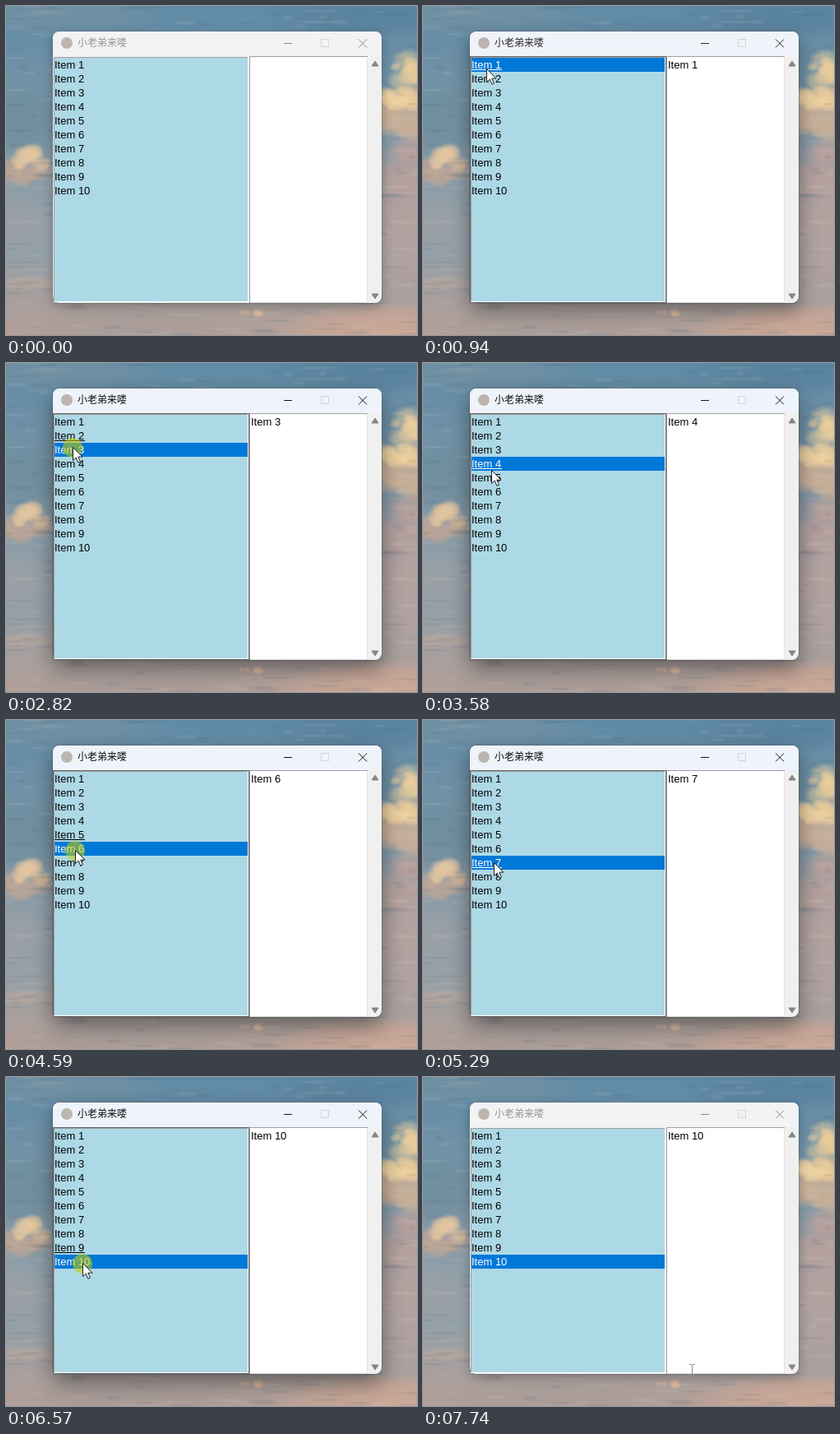
An HTML page with a canvas for the animation above (7800 ms loop, 500x400 px).

```html
<!DOCTYPE html>
<html lang="zh">
<head>
<meta charset="utf-8">
<title>Listbox</title>
<style>
  html, body { margin: 0; width: 100%; height: 100%; overflow: hidden; }
  #stage { position: relative; width: 500px; height: 400px; overflow: hidden; }
  #stage > * { position: absolute; left: 0; top: 0; }
  #stage > #win { left: 57px; top: 31px; width: 400px; height: 330px; border-radius: 8px; background: #f0f0f0; }
  text { font: 13px "Liberation Sans", Arial, sans-serif; white-space: pre; }
  #title { font: 12px "Noto Sans CJK SC", "Noto Sans CJK", sans-serif; }
</style>
</head>
<body>
<div id="stage">
  <canvas id="sky" width="500" height="400"></canvas>
  <div id="win"></div>
  <svg width="500" height="400" viewBox="0 0 500 400">
    <path id="bar" d="M57 61V39a8 8 0 0 1 8-8H449a8 8 0 0 1 8 8V61Z"/>
    <circle cx="74" cy="45" r="7" fill="#bdb6ae"/>
    <text id="title" x="87" y="49">小老弟来喽</text>
    <g id="buttons" fill="none">
      <path d="M338 45.5H348"/>
      <path d="M429 40.5L439 50.5M439 40.5L429 50.5"/>
    </g>
    <rect x="383.5" y="40.5" width="9" height="9" fill="none" stroke="#d3d5d9"/>

    <g shape-rendering="crispEdges">
      <rect x="58" y="62" width="237" height="298" fill="#add8e6"/>
      <path d="M58.5 360V62.5H295" fill="none" stroke="#a0a0a0"/>
      <path d="M58 359.5H294.5V62" fill="none" stroke="#fff"/>
      <rect id="focus" x="57.5" y="61.5" width="238" height="299" fill="none" stroke="#646464"/>
      <rect x="296" y="61" width="144" height="300" fill="#fff"/>
      <path d="M296.5 361V61.5H440" fill="none" stroke="#a0a0a0"/>
      <path d="M439.5 62V360.5H297" fill="none" stroke="#e3e3e3"/>
      <rect id="chosen" x="59" width="235" height="17" fill="#0078d7"/>
    </g>
    <path d="M445 73L449 67L453 73ZM445 350L449 356L453 350Z" fill="#858585" stroke="#858585" stroke-linejoin="round"/>
    <g id="rows"></g>
    <rect id="underline" x="59" width="37" height="1" shape-rendering="crispEdges"/>
    <text id="detail" x="298" y="76"></text>

    <g id="pointer">
      <circle id="press" cy="1" r="12" fill="#c8cd00" fill-opacity=".55"/>
      <path id="arrow" d="M.5 .5V16.5L4.2 13L6.8 19.2L9.4 18.1L6.8 12.1H12Z" fill="#fff" stroke="#222"/>
      <path id="beam" d="M-3 -5.5H-1L.5 -4.5L2 -5.5H4M.5 -4.5V5.5M-3 6.5H-1L.5 5.5L2 6.5H4" fill="none" stroke="#8c8c8c"/>
    </g>
  </svg>
</div>
<script>
const LOOP = 7800, STEP = 77.4, ROW = 17, TOP = 63;
const FOCUS_ON = 780, FOCUS_OFF = 7550, FADE = 190;
const $ = id => document.getElementById(id);

// [press, release] for each list item in turn
const clicks = [
  [780, 930], [2100, 2260], [2750, 2910], [3340, 3500], [3950, 4100],
  [4540, 4700], [5050, 5220], [5600, 5760], [6080, 6230], [6420, 6560]
];

// [time, x, y] of the pointer tip
const path = [
  [70, 215, 400], [760, 76, 76], [1240, 78, 76], [1620, 80, 88], [2300, 80, 88],
  [2700, 81, 102], [2950, 81, 102], [3300, 83, 121], [3450, 83, 122], [3570, 83, 130],
  [3880, 84, 140], [4150, 84, 141], [4500, 84, 158], [4720, 84, 158], [5000, 86, 173],
  [5240, 86, 173], [5550, 89, 190], [5770, 89, 191], [5950, 91, 207], [6220, 91, 207],
  [6400, 93, 226], [6640, 93, 227], [7400, 327, 355]
];

const rows = clicks.map((_, i) => {
  const row = document.createElementNS("http://www.w3.org/2000/svg", "text");
  row.setAttribute("x", 59);
  row.setAttribute("y", TOP + ROW * i + 13);
  row.textContent = "Item " + (i + 1);
  $("rows").append(row);
  return row;
});

function random(seed) {
  return () => (seed = (seed * 16807) % 2147483647) / 2147483647;
}

function paintSky() {
  const ctx = $("sky").getContext("2d"), rnd = random(41);
  const base = ctx.createLinearGradient(0, 0, 0, 400);
  [[0, "#5f8aa6"], [.25, "#7393a7"], [.5, "#8b9ca8"], [.75, "#93a0a8"], [.9, "#a89f9d"], [1, "#b4a098"]]
    .forEach(([at, color]) => base.addColorStop(at, color));
  ctx.fillStyle = base;
  ctx.fillRect(0, 0, 500, 400);

  function glow(x, y, rx, ry, rgb, alpha) {
    ctx.save();
    ctx.translate(x, y);
    ctx.scale(rx, ry);
    const g = ctx.createRadialGradient(0, 0, 0, 0, 0, 1);
    g.addColorStop(0, `rgba(${rgb},${alpha})`);
    g.addColorStop(.55, `rgba(${rgb},${alpha * .75})`);
    g.addColorStop(1, `rgba(${rgb},0)`);
    ctx.fillStyle = g;
    ctx.fillRect(-1, -1, 2, 2);
    ctx.restore();
  }
  function puffs(x, y, w, h, rgb, n, size) {
    for (let i = 0; i < n; i++) {
      const r = size * (.5 + rnd());
      glow(x + (rnd() - .5) * w, y + (rnd() - .5) * h, r * 1.3, r, rgb, .6);
    }
  }

  glow(60, 10, 150, 26, "128,150,160", .5);
  glow(440, 12, 130, 30, "84,124,154", .6);
  glow(20, 140, 70, 50, "102,137,154", .6);
  glow(490, 260, 70, 110, "190,162,156", .8);
  glow(470, 395, 150, 36, "208,168,148", .8);
  glow(150, 390, 170, 22, "164,154,152", .6);
  glow(10, 265, 60, 40, "160,160,164", .6);
  glow(15, 338, 60, 9, "186,168,156", .7);

  puffs(484, 130, 44, 50, "205,176,150", 16, 14);
  puffs(488, 92, 30, 56, "236,206,154", 18, 11);
  puffs(472, 118, 30, 24, "238,210,160", 10, 8);
  puffs(490, 205, 40, 60, "186,160,154", 10, 14);
  puffs(18, 202, 56, 16, "190,166,150", 12, 10);
  puffs(22, 186, 28, 20, "228,198,158", 12, 8);
  puffs(44, 192, 12, 8, "216,186,152", 5, 6);
  puffs(298, 374, 24, 3, "222,184,158", 6, 4);

  for (let i = 0; i < 420; i++) {
    const light = rnd() < .5 ? "215,210,200" : "60,90,110";
    glow(rnd() * 500, rnd() * 400, 6 + rnd() * 24, 1 + rnd() * 2.5, light, .13);
  }
}

const clamp = v => Math.max(0, Math.min(1, v));
const mix = (a, b, k) => `rgb(${a.map((v, i) => Math.round(v + (b[i] - v) * k))})`;
const show = (id, on) => $(id).style.display = on ? "" : "none";

function pointerAt(t) {
  const i = path.findIndex(p => p[0] > t);
  if (i < 0) return path[path.length - 1].slice(1);
  const [t0, x0, y0] = path[Math.max(0, i - 1)], [t1, x1, y1] = path[i];
  const k = clamp((t - t0) / (t1 - t0 || 1)), e = k * k * (3 - 2 * k);
  return [x0 + (x1 - x0) * e, y0 + (y1 - y0) * e];
}

function draw(now) {
  const t = Math.floor((now % LOOP) / STEP + 1e-6) * STEP + 5;
  const focused = t >= FOCUS_ON && t < FOCUS_OFF;
  const k = clamp((t - FOCUS_ON) / FADE) * (1 - clamp((t - FOCUS_OFF) / FADE));

  $("win").style.boxShadow =
    `0 0 0 1px rgba(70,80,90,${.2 + .15 * k}), 0 ${4 + 6 * k}px ${14 + 12 * k}px rgba(0,0,0,${.28 + .14 * k})`;
  $("bar").setAttribute("fill", mix([243, 243, 245], [239, 243, 251], k));
  $("title").setAttribute("fill", mix([150, 150, 150], [16, 16, 16], k));
  $("buttons").setAttribute("stroke", mix([140, 140, 140], [20, 20, 20], k));
  show("focus", focused);

  const chosen = clicks.filter(c => t >= c[0]).length - 1;
  const active = Math.max(0, clicks.filter(c => t >= c[1]).length - 1);
  rows.forEach((row, i) => row.setAttribute("fill", i === chosen ? "#fff" : "#000"));
  show("chosen", chosen >= 0);
  $("chosen").setAttribute("y", TOP + ROW * Math.max(0, chosen));
  $("detail").textContent = chosen < 0 ? "" : "Item " + (chosen + 1);
  show("underline", focused);
  $("underline").setAttribute("y", TOP + ROW * active + 14);
  $("underline").setAttribute("width", active === 9 ? 43 : 37);
  $("underline").setAttribute("fill", active === chosen ? "#fff" : "#000");

  const [x, y] = pointerAt(t).map(Math.round);
  const overText = x > 296 && x < 440 && y > 61 && y < 361;
  $("pointer").setAttribute("transform", `translate(${x} ${y})`);
  show("pointer", t >= path[0][0]);
  show("arrow", !overText);
  show("beam", overText);
  show("press", clicks.some(c => t >= c[0] && t < c[1]));
}

paintSky();
const start = performance.now();
function tick() {
  draw(performance.now() - start);
  requestAnimationFrame(tick);
}
tick();
</script>
</body>
</html>
```
